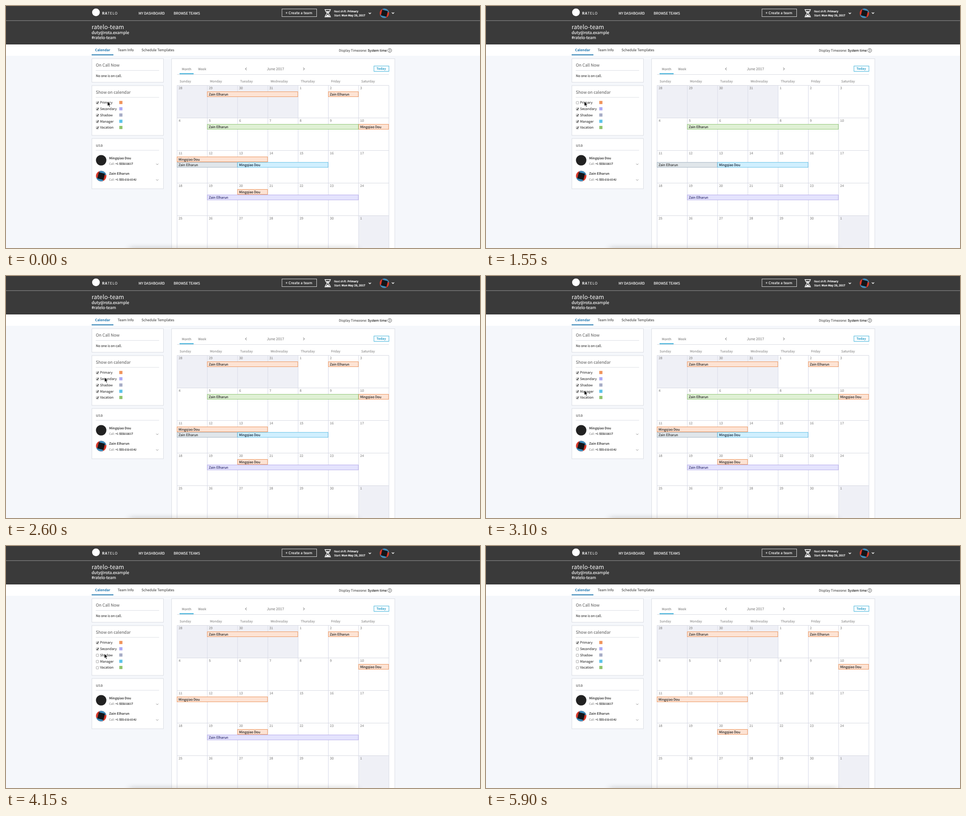
These frames come from a looping animation (1046x535 px, 5950 ms). An HTML page:

```html
<!DOCTYPE html>
<html lang="en">
<head>
<meta charset="utf-8">
<title>Team calendar</title>
<style>
  html, body { margin: 0; width: 100%; height: 100%; overflow: hidden; background: #f5f7fb; }
  svg { display: block; width: 1046px; height: 535px; }
  text {
    font-family: "Noto Sans CJK SC", "Noto Sans CJK JP", "Noto Sans CJK", "Open Sans", sans-serif;
    white-space: pre;
    text-rendering: geometricPrecision;
  }
</style>
</head>
<body>
<svg id="stage" viewBox="0 0 1046 535" xmlns="http://www.w3.org/2000/svg">
  <defs>
    <filter id="soft" x="-10%" y="-200%" width="120%" height="500%"><feGaussianBlur stdDeviation="8 5"/></filter>
    <clipPath id="round"><circle r="11.5"/></clipPath>
  </defs>
</svg>
<script>
const LOOP = 5950;
const PEOPLE = { ling: 'Mingqiao Dou', zain: 'Zain Elharun' };
const stage = document.getElementById('stage');

function add(tag, attrs, parent = stage) {
  const node = document.createElementNS('http://www.w3.org/2000/svg', tag);
  for (const key in attrs) node.setAttribute(key, attrs[key]);
  return parent.appendChild(node);
}

const box = (x, y, w, h, fill, stroke, parent) =>
  add('rect', { x, y, width: w, height: h, fill, stroke: stroke || 'none' }, parent);

const path = (d, stroke, width = 1, fill = 'none', parent) =>
  add('path', { d, stroke, 'stroke-width': width, fill }, parent);

// Text is placed by the vertical middle of its capitals; regular text gets a hairline for body.
function label(x, y, str, size, fill, weight = 400, spacing = 0, parent) {
  const node = add('text', {
    x, y: y + size * 0.36, fill, stroke: fill, 'stroke-width': weight === 400 ? 0.15 : 0,
    'font-size': size, 'font-weight': weight, 'letter-spacing': spacing
  }, parent);
  node.textContent = str;
  return node;
}

function strong(node, str, fill, weight = 600) {
  add('tspan', { 'font-weight': weight, fill, stroke: fill }, node).textContent = str;
}

const chevron = (x, y, r, color, width) =>
  path(`M${x - r} ${y - r / 2}l${r} ${r}l${r} ${-r}`, color, width);

function avatar(x, y, scale) {
  const g = add('g', { transform: `translate(${x} ${y}) scale(${scale})`, 'clip-path': 'url(#round)' });
  box(-12, -12, 24, 24, '#d93a2b', '', g);
  path('M-5 -12H12V-3L0 0ZM5 12H-12V5L0 0Z', 'none', 0, '#3b8dbd', g);
  add('rect', { x: -7, y: -7, width: 14, height: 14, fill: '#15161a', transform: 'rotate(13)' }, g);
}

function drawHeader() {
  box(0, 0, 1046, 85, '#3a3a3a');
  box(0, 31.8, 1046, 1.2, '#858585');
  add('circle', { cx: 198.5, cy: 14, r: 8.5, fill: '#fff' });
  strong(label(212, 16, 'RA', 8, '#fff', 700, 0.75), 'TELO', '#fff', 400);
  label(292.5, 16, 'MY DASHBOARD', 7.73, '#fff');
  label(370, 16, 'BROWSE TEAMS', 7.73, '#fff');
  box(609, 6.5, 76.5, 17, 'none', '#d5d5d5');
  label(617, 15, '+ Create a team', 7.7, '#fff', 400, 0.25);
  path('M703 8H717M703 24H717M705 8.5V11L709 16L705 21V23.5M715 8.5V11L711 16L715 21V23.5', '#fff', 1.3);
  path('M706.5 11.5H713.5L710 15.5ZM705.5 23L710 18.5L714.5 23Z', 'none', 0, '#fff');
  strong(label(724, 11.5, 'Next shift: ', 6, '#fff'), 'Primary', '#fff');
  strong(label(724, 21, 'Start: ', 6, '#fff'), 'Mon May 29, 2017', '#fff');
  chevron(803, 16, 2.5, '#fff', 1.4);
  avatar(835, 16, 0.91);
  chevron(854, 15.5, 2.5, '#fff', 1.4);
  label(189, 46.5, 'ratelo-team', 12.8, '#fff', 300, 0.2);
  label(189, 59, 'duty@rota.example', 9, '#fff');
  label(189, 70, '#ratelo-team', 9, '#fff');
}

function drawTabs() {
  box(0, 85, 1046, 25, '#fff');
  label(196.5, 97.5, 'Calendar', 7.5, '#1b73ae', 600);
  label(246.5, 97.5, 'Team Info', 7.68, '#555');
  label(299, 97.5, 'Schedule Templates', 7.7, '#555');
  box(189, 107, 48, 2, '#2a7db3');
  strong(label(734.5, 98.5, 'Display Timezone: ', 7.3, '#555'), 'System time', '#222', 500);
  add('circle', { cx: 846.8, cy: 98.2, r: 4.2, fill: 'none', stroke: '#444', 'stroke-width': 0.9 });
  label(845.2, 98.3, '?', 6.2, '#333', 600);
}

function panel(y, height, title) {
  box(189.5, y, 158, height, '#fff', '#dadde3');
  label(198.3, y + 14.2, title, 9.2, '#555', 300);
  path(`M198 ${y + 26}H338`, '#dcdee4');
}

function person(y, name, phone) {
  label(227.5, y - 5, name, 7.2, '#444', 600);
  strong(label(227.5, y + 8, 'Call: ', 6.15, '#999'), phone, '#222', 500);
  chevron(333.8, y + 8.8, 2.4, '#888', 1);
}

const ROLES = {
  Primary:   { y: 213.3, color: '#f0965e', fill: '#fde3d4', edge: '#ec945c', ink: '#222', off: [[1050, 1700]] },
  Secondary: { y: 227.2, color: '#adabf4', fill: '#e4e3fd', edge: '#b3aaea', ink: '#2f2c70', off: [[2000, 2500], [4500, LOOP]] },
  Shadow:    { y: 241, color: '#a8adc6', fill: '#e0e6ea', edge: '#a5b6c2', ink: '#333', off: [[4050, LOOP]] },
  Manager:   { y: 254.9, color: '#5ec4ea', fill: '#d0effe', edge: '#62c0e6', ink: '#123', off: [[3250, LOOP]] },
  Vacation:  { y: 268.6, color: '#93c56f', fill: '#dff0d4', edge: '#93c678', ink: '#222', off: [[3500, LOOP]] }
};

function drawSidebar() {
  panel(116.5, 52, 'On Call Now');
  label(198.3, 154.5, 'No one is on call.', 7.3, '#444');
  panel(176, 110, 'Show on calendar');
  for (const [name, role] of Object.entries(ROLES)) {
    const { y } = role;
    add('rect', { x: 199, y: y - 2.2, width: 5.6, height: 5.6, rx: 1, fill: '#f8f8f8', stroke: '#999', 'stroke-width': 0.8 });
    role.check = path(`M200.2 ${y + 0.7}l1.3 1.5l2.5 -4`, '#222', 1.2);
    label(207.5, y, name, 7.4, '#444');
    box(250, y - 3.5, 7, 7, role.color);
  }
  panel(293, 111, 'usa');
  add('circle', { cx: 210, cy: 341, r: 11.5, fill: '#222' });
  person(341, PEOPLE.ling, '+1 555010017');
  avatar(210, 376, 1);
  person(375.8, PEOPLE.zain, '+1 555-010-0142');
}

const colX = c => 377.5 + c * 66.78;
const rowY = r => 175.5 + r * 72;

// role, person, week, first column, columns, slot
const SHIFTS = [
  ['Primary', 'zain', 0, 1, 3, 0],
  ['Primary', 'zain', 0, 5, 1, 0],
  ['Vacation', 'zain', 1, 1, 5, 0],
  ['Primary', 'ling', 1, 6, 1, 0],
  ['Primary', 'ling', 2, 0, 3, 0],
  ['Shadow', 'zain', 2, 0, 2, 1],
  ['Manager', 'ling', 2, 2, 3, 1],
  ['Primary', 'ling', 3, 2, 1, 0],
  ['Secondary', 'zain', 3, 1, 5, 1]
];

function drawCalendar() {
  box(365.5, 116.5, 492.5, 440, '#fff', '#dadde3');
  label(388, 139.5, 'Month', 6.95, '#8b8b8b');
  label(424, 139.5, 'Week', 7.05, '#8b8b8b');
  path('M377.5 151.5H845', '#d9dbe2');
  box(383, 148.7, 31, 2, '#2fa9d6');
  path('M531 136.4L528.3 139.1L531 141.8M655.9 136.4L658.6 139.1L655.9 141.8', '#888', 1.1);
  label(575.5, 139.5, 'June 2017', 8.05, '#888');
  box(812, 132.7, 33, 11.8, '#fff', '#3db2da');
  label(817.5, 138.7, 'Today', 7.1, '#2a9fcb', 600);

  const days = ['Sunday', 'Monday', 'Tuesday', 'Wednesday', 'Thursday', 'Friday', 'Saturday'];
  days.forEach((day, c) => label(colX(c) + 5.8, 166.3, day, 7.1, '#929292'));

  box(colX(0), rowY(0), colX(4) - colX(0), 72, '#eff0f6');
  box(colX(6), rowY(4), colX(1) - colX(0), 72, '#eff0f6');
  for (let c = 0; c < 8; c++) path(`M${colX(c)} ${rowY(0)}V535`, '#dcdeea', 1.2);
  for (let r = 0; r < 5; r++) path(`M${colX(0)} ${rowY(r)}H${colX(7)}`, '#d7d9e2', 1.1);
  for (let i = 0; i < 35; i++) {
    const date = i < 4 ? 28 + i : (i - 4) % 30 + 1;
    label(colX(i % 7) + 3.4, rowY(Math.floor(i / 7)) + 6.2, date, 7.4, '#8c8c8c');
  }

  for (const role of Object.values(ROLES)) role.bars = add('g', {});
  for (const [name, who, week, first, span, slot] of SHIFTS) {
    const { bars, fill, edge, ink } = ROLES[name];
    const x = colX(first), y = rowY(week) + 14 + slot * 12.2;
    box(x, y, colX(first + span) - x - 0.7, 11, fill, edge, bars);
    label(x + 3.2, y + 5.7, PEOPLE[who], 7.3, ink, 400, 0, bars);
  }
}

drawHeader();
drawTabs();
drawSidebar();
drawCalendar();
add('rect', { x: 272, y: 531, width: 504, height: 20, fill: '#000', opacity: 0.11, filter: 'url(#soft)' });
const cursor = path('M0 0V10.2L2.3 8L4 12L5.7 11.2L4 7.4H7.2Z', '#fff', 0.7, '#000');

// time, x, y of the pointer tip
const TRACK = [
  [0, 224, 211], [450, 224, 211], [850, 217, 211], [1750, 217, 211],
  [1950, 217.5, 224], [2650, 217.5, 224], [3000, 217, 253], [3300, 217, 253],
  [3450, 215, 266], [3700, 215, 266], [3950, 217, 238], [4150, 217, 238],
  [4400, 217.5, 223], [LOOP, 217.5, 223]
];
const CURSOR_GONE = 5650;

function pointerAt(t) {
  const i = TRACK.findIndex(step => step[0] > t);
  const [t0, x0, y0] = TRACK[i - 1], [t1, x1, y1] = TRACK[i];
  const p = (t - t0) / (t1 - t0), ease = p * p * (3 - 2 * p);
  return [x0 + (x1 - x0) * ease, y0 + (y1 - y0) * ease];
}

const show = (node, on) => node.setAttribute('visibility', on ? 'visible' : 'hidden');

function render(t) {
  for (const { off, check, bars } of Object.values(ROLES)) {
    const on = !off.some(([from, to]) => t >= from && t < to);
    show(check, on);
    show(bars, on);
  }
  cursor.setAttribute('transform', `translate(${pointerAt(t)})`);
  show(cursor, t < CURSOR_GONE);
}

function tick() {
  render(performance.now() % LOOP);
  requestAnimationFrame(tick);
}
tick();
</script>
</body>
</html>
```
